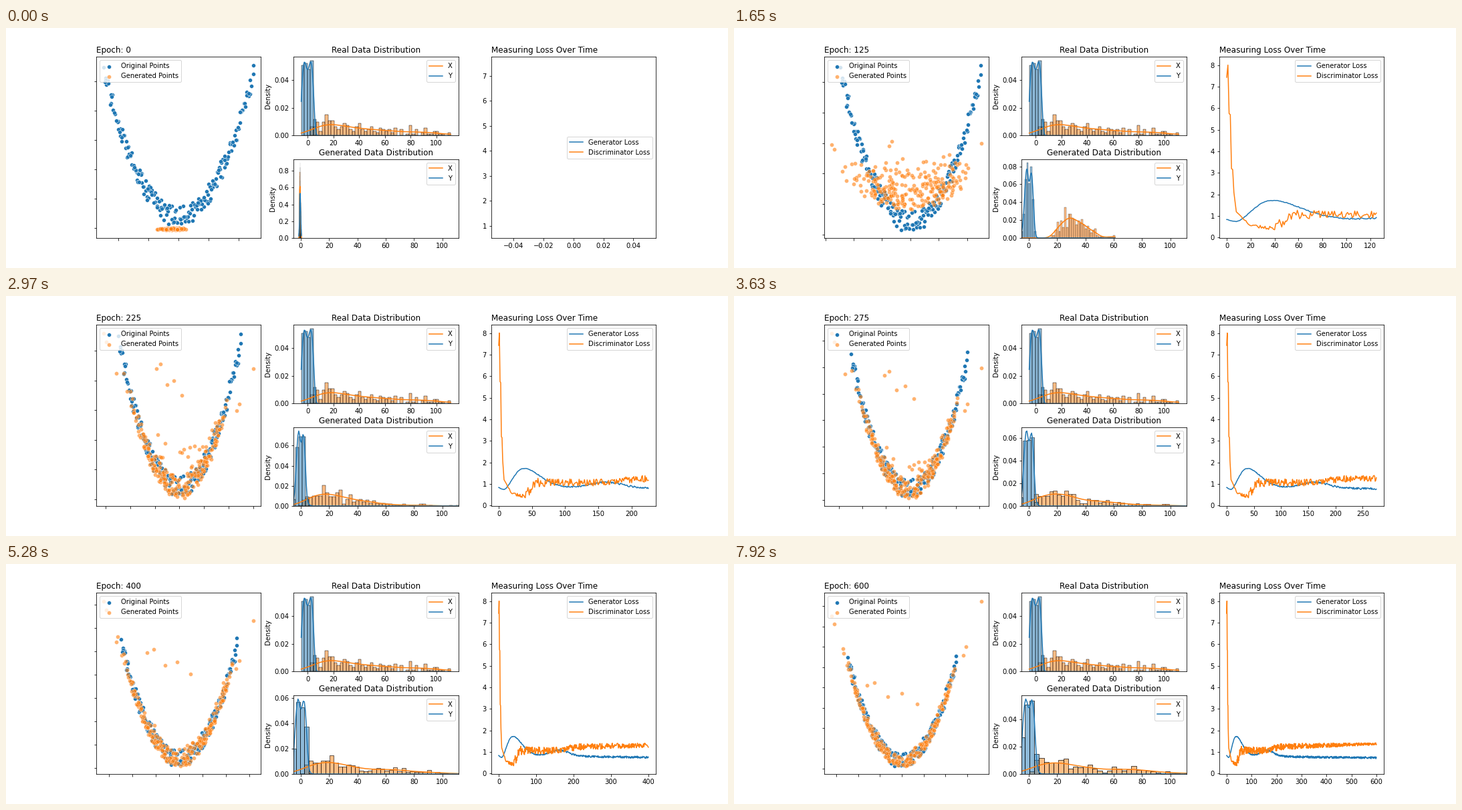
Animation of 1080 by 360 pixels, one loop 8000 ms. Source, as a matplotlib script:

```python
import numpy as np
import matplotlib.pyplot as plt
from matplotlib.animation import FuncAnimation
from matplotlib.collections import PolyCollection

BLUE, ORANGE = "#1f77b4", "#ff7f0e"
FRAMES, INTERVAL = 100, 80
STEP_MS, STEP_EPOCHS, LAST = 330, 25, 24
N_REAL, N_FAKE, BINS = 200, 240, 50

rng = np.random.default_rng(7)


def spread(n, bump=0.02):
    """Even values in -1..1, slightly denser around +-0.5, in random order."""
    u = np.linspace(-1, 1, n) + rng.uniform(-2, 2, n) / n
    return rng.permutation(np.clip(u + bump * np.sin(2 * np.pi * u), -1, 1))


def curve(t, *points):
    xs, ys = zip(*points)
    return np.interp(t, xs, ys)


def bell(t, center, width):
    return np.exp(-0.5 * ((t - center) / width) ** 2)


def padded(*arrays):
    """Limits of all values with a 5 % margin."""
    low = min(a.min() for a in arrays)
    high = max(a.max() for a in arrays)
    margin = 0.05 * (high - low)
    return low - margin, high + margin


def kde(data, grid):
    bw = data.std(ddof=1) * len(data) ** -0.2
    z = (grid[:, None] - data) / bw
    return 0.5 * np.exp(-z * z / 2).mean(axis=1) / (bw * np.sqrt(2 * np.pi))


# Real data: a noisy parabola
real_x = 4.96 * spread(N_REAL)
real_y = np.minimum(4 * real_x ** 2 + rng.uniform(1, 15, N_REAL), 111.3)

# Latent values that stay with each generated point
latent = spread(N_FAKE)
x_noise = np.clip(rng.normal(size=N_FAKE), -2, 2)
y_noise = np.clip((rng.gamma(5, 1, N_FAKE) - 5) / np.sqrt(5), -1.7, 2.8)
lifted = np.maximum(rng.random(N_FAKE) - 0.88, 0) / 0.12


def cloud(k):
    """Main body: a flat line that rises, then bends into the parabola."""
    half = curve(k, (0, 0.4), (5, 3.6), (9, 3.65), (13, 4.4), (24, 4.8))
    x_sigma = curve(k, (0, 0.3), (5, 0.6), (9, 0.45), (24, 0.3))
    base = curve(k, (0, -0.5), (5, 28), (9, 7))
    bend = curve(k, (0, 0), (5, 0.8), (9, 3.9))
    y_sigma = curve(k, (0, 0.28), (5, 6.8), (9, 4), (24, 3))
    lift = curve(k, (5, 0), (9, 40), (13, 18), (24, 4))
    x = curve(k, (0, -0.4), (5, 0)) + half * latent + x_sigma * x_noise
    y = base + bend * x ** 2 + y_sigma * y_noise
    return x, y + lift * lifted * np.exp(-(x / 2) ** 2)


def strays(k):
    """Overshooting arm tips and a few points floating inside the parabola."""
    r = max(0, (k - 5) / 19)
    ease = 1 - np.exp(-4 * r)
    left = np.array([-5.55 - 0.9 * ease - 0.6 * bell(k, 12.5, 1.8), 59 + 93 * ease])
    right = np.array([5 + 1.4 * (1 - np.exp(-6 * r)) + 0.9 * r ** 8,
                      60 + 105 * r ** 0.85])
    points = [tip * (f, f ** 1.5)
              for tip, parts in ((left, (1, 0.965, 0.83)), (right, (1, 0.81, 0.77)))
              for f in parts]

    fan = curve(k, (0, 0.1), (9, 0.45), (20, 1))
    height = curve(k, (5, 52), (9, 82), (13, 94), (20, 91), (24, 76))
    for x, dy in ((-3.2, 6), (-2.5, 9), (-1.3, -5), (0, -2), (1.42, -12)):
        points.append((-0.8 + (x + 0.8) * fan, height + dy))

    x, y = np.array(points).T
    t = min(1, k / 5)
    return x * t + (1 - t) * (0.15 * x - 0.4), y * t - 0.4 * (1 - t)


# Losses per epoch
epochs = np.arange(LAST * STEP_EPOCHS + 1)
wobble = rng.uniform(-1, 1, (2, len(epochs)))
gen_loss = (0.72 + 0.18 * np.exp(-epochs / 250)
            + 0.85 * bell(epochs, 37, np.where(epochs < 37, 13, 25))
            + 0.27 * bell(epochs, 163, 25) - 0.22 * bell(epochs, 9, 6)
            + wobble[0] * curve(epochs, (0, 0.01), (200, 0.05)))
disc_loss = curve(epochs, (0, 7.43), (1, 8), (2, 5.75), (3, 5.7), (4, 3.2),
                  (5, 3.15), (6, 2.1), (8, 1.2), (20, 0.55), (38, 0.42),
                  (60, 1.08), (150, 1.07), (220, 1.25), (600, 1.38))
disc_loss += wobble[1] * curve(epochs, (8, 0), (35, 0.11), (50, 0.32),
                               (80, 0.16), (200, 0.16), (600, 0.05))
disc_loss = np.maximum(disc_loss, 0.31)

# Layout
fig = plt.figure(figsize=(15, 5), dpi=72)
grid_spec = fig.add_gridspec(1, 3, left=0.125, right=0.9, bottom=0.125, top=0.88)
ax_pts = fig.add_subplot(grid_spec[0])
middle = grid_spec[1].subgridspec(2, 1, hspace=0.3)
ax_real = fig.add_subplot(middle[0])
ax_fake = fig.add_subplot(middle[1])
ax_loss = fig.add_subplot(grid_spec[2])


def scatter(color, label, alpha=None):
    return ax_pts.scatter([], [], s=36, color=color, edgecolor="w",
                          linewidth=0.48, alpha=alpha, label=label)


class DensityPanel:
    """Two overlaid histograms with density curves, the orange one below."""

    def __init__(self, ax, title):
        self.ax = ax
        ax.set_title(title)
        ax.set_ylabel("Density")
        self.bars, self.lines = [], []
        for color, name in ((ORANGE, "X"), (BLUE, "Y")):
            bars = PolyCollection([], facecolor=(color, 0.5), edgecolor="k", zorder=1)
            ax.add_collection(bars, autolim=False)
            self.bars.append(bars)
            self.lines += ax.plot([], [], color=color, label=name)
        ax.legend(loc="upper right")

    def show(self, x, y):
        low, high = min(x.min(), y.min()), max(x.max(), y.max())
        edges = np.linspace(low, high, BINS + 1)
        support = np.linspace(low, high, 200)
        width = edges[1] - edges[0]
        top = 0
        for bars, line, data in zip(self.bars, self.lines, (y, x)):
            heights = np.histogram(data, edges)[0] / (2 * len(data) * width)
            bars.set_verts([[(a, 0), (a + width, 0), (a + width, h), (a, h)]
                            for a, h in zip(edges, heights) if h > 0])
            bars.set_linewidth(max(0.1, 0.2 * width))
            density = kde(data, support)
            line.set_data(support, density)
            top = max(top, heights.max(), density.max())
        self.ax.set_ylim(0, 1.05 * top)


real_pts = scatter(BLUE, "Original Points")
fake_pts = scatter(ORANGE, "Generated Points", 0.6)
real_pts.set_offsets(np.column_stack([real_x, real_y]))
ax_pts.tick_params(labelleft=False, labelbottom=False)
ax_pts.legend(loc="upper left")
title = ax_pts.set_title("Epoch: 0", loc="left")

real_panel = DensityPanel(ax_real, "Real Data Distribution")
real_panel.show(real_x, real_y)
ax_real.set_xlim(padded(real_x, real_y))
fake_panel = DensityPanel(ax_fake, "Generated Data Distribution")
ax_fake.set_xlim(real_x.min(), real_y.max())

ax_loss.set_title("Measuring Loss Over Time", loc="left")
gen_line, = ax_loss.plot([], [], color=BLUE, label="Generator Loss")
disc_line, = ax_loss.plot([], [], color=ORANGE, label="Discriminator Loss")
loss_legend = ax_loss.legend(loc="upper right")


def show(k):
    x, y = np.hstack([cloud(k), strays(k)])
    title.set_text(f"Epoch: {k * STEP_EPOCHS}")
    fake_pts.set_offsets(np.column_stack([x, y]))
    ax_pts.set(xlim=padded(real_x, x), ylim=padded(real_y, y))
    fake_panel.show(x, y)

    n = k * STEP_EPOCHS + 1
    gen_line.set_data(epochs[:n], gen_loss[:n])
    disc_line.set_data(epochs[:n], disc_loss[:n])
    ax_loss.relim()
    ax_loss.autoscale_view()
    loss_legend.set_loc("upper right" if k else "center right")


def update(i):
    show(min(LAST, (i * INTERVAL + INTERVAL - 1) // STEP_MS))
    return []


anim = FuncAnimation(fig, update, frames=FRAMES, interval=INTERVAL,
                     init_func=lambda: update(0), repeat=True, repeat_delay=0)
plt.show()
```
